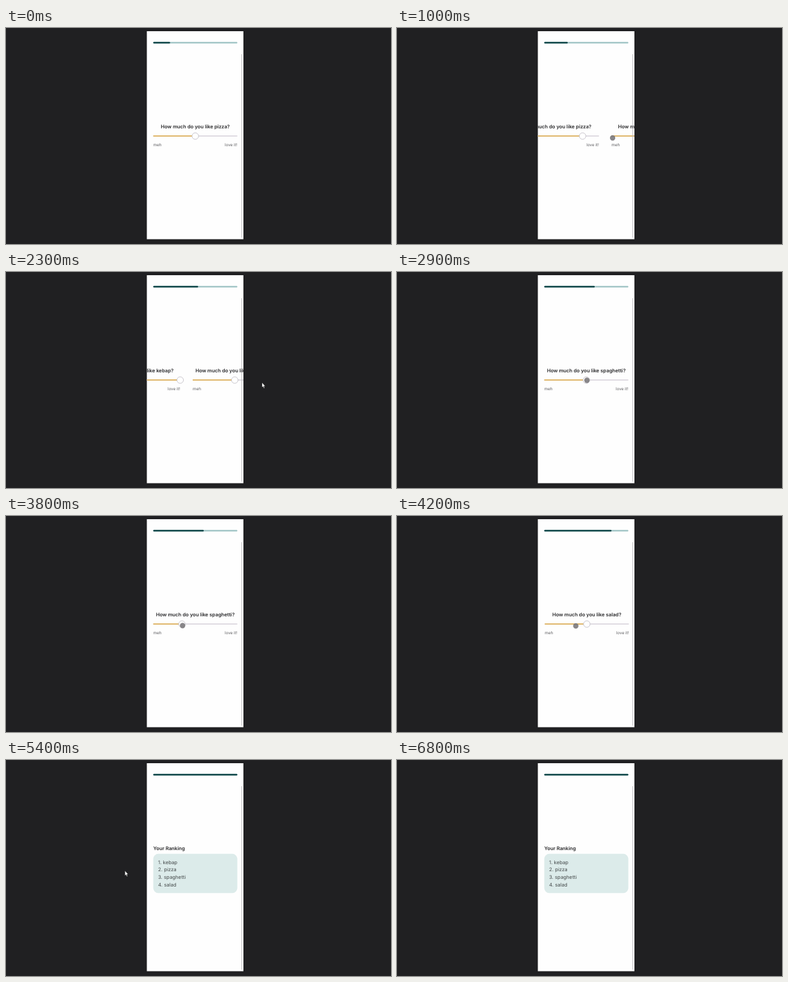
Animation of 600 by 338 pixels, one loop 8 s. Source, as an HTML page:

```html
<!DOCTYPE html>
<html lang="en">
<head>
<meta charset="utf-8">
<title>Food quiz</title>
<style>
html, body { margin: 0; height: 100%; overflow: hidden; background: #202022; }
svg { display: block; width: 600px; height: 338px; }
text { font: 400 6.35px Inter, sans-serif; fill: #5c5c5f; text-rendering: geometricPrecision; }
.title { font-size: 7.71px; font-weight: 600; fill: #29292b; }
.item { font-size: 7.75px; fill: #454a4b; }
</style>
</head>
<body>
<svg viewBox="0 0 600 338">
  <clipPath id="screen"><rect x="219.5" y="5" width="150.5" height="325.5"/></clipPath>
  <rect x="219.5" y="5" width="150.5" height="325.5" fill="#fefefe"/>
  <rect x="229.5" y="21.8" width="131" height="2.4" rx="1" fill="#a2c5c6"/>
  <rect id="bar" x="229.5" y="21.8" height="2.4" rx="1" fill="#0c4446"/>
  <g clip-path="url(#screen)"><g id="pages"></g></g>
  <path d="M367.6 41V328" stroke="#bbb9bd"/>
  <circle id="dot" r="4.2" fill="#777579" fill-opacity=".88"/>
  <path id="arrow" d="M0 0V7.6L1.7 6.1 2.9 8.9 4.1 8.4 2.9 5.7H5.1Z" fill="#fff" stroke="#111" stroke-width=".4"/>
</svg>
<script>
const $ = id => document.getElementById(id);
const LOOP = 8000, STEP = 100, LEFT = 229.5, WIDTH = 131, PAGE = 150.5, SLIDE = 300, PAUSE = 40;
const foods = ['pizza', 'kebap', 'spaghetti', 'salad'];
const ranked = ['kebap', 'pizza', 'spaghetti', 'salad'];

// pointer moves: start, duration, x, y; the first four even ones drag the sliders
const moves = [
  [500, 400, 336, 172], [1400, 300, 299.5, 170.5],
  [1750, 400, 399, 173], [2300, 600, 296, 169.5],
  [3400, 500, 270, 172], [4000, 600, 296, 172],
  [4700, 300, 185, 170], [5000, 600, 185.5, 175],
  [5600, 500, 259, 195], [6500, 200, 151, 61]
];
const drags = foods.map((_, i) => {
  const [grab, time] = moves[2 * i];
  return { grab, drop: grab + time };
});

const clamp = (v, min = 0, max = 1) => Math.min(max, Math.max(min, v));
const ease = u => 1 - (1 - clamp(u) ** 1.35) ** 3;
const slid = t => drags.reduce((sum, d) => sum + ease((t - d.drop - PAUSE) / SLIDE), 0);

const pointer = t => moves.reduce(([x, y], [start, time, toX, toY]) => {
  const u = clamp((t - start) / time);
  return [x + (toX - x) * u, y + (toY - y) * u];
}, [296, 171]);

function knobX({ grab, drop }, t) {
  const pull = pointer(clamp(t, grab, drop))[0] - pointer(grab)[0];
  return LEFT + clamp(WIDTH / 2 + pull, 0, WIDTH);
}

const question = (food, i) => `<g transform="translate(${i * PAGE})">
  <text class="title" x="295" y="157.2" text-anchor="middle">How much do you like ${food}?</text>
  <path d="M229.5 169H360.5" stroke="#d5d1d8" stroke-width="1.5"/>
  <path id="fill${i}" stroke="#dfab45" stroke-width="1.6"/>
  <circle id="knob${i}" cy="169.1" r="5.1" fill="#fff" stroke="#c2bfc7" stroke-width=".9"/>
  <text x="229.5" y="184.5">meh</text>
  <text x="360.5" y="184.5" text-anchor="end">love it!</text></g>`;

const ranking = `<g transform="translate(${foods.length * PAGE})">
  <text class="title" x="229.5" y="140.7">Your Ranking</text>
  <rect x="229.5" y="146.8" width="131" height="61.5" rx="8" fill="#dcebea"/>` +
  ranked.map((food, i) =>
    `<text class="item" x="237" y="${162.8 + 11.6 * i}">${i + 1}. ${food}</text>`).join('') + '</g>';

$('pages').innerHTML = foods.map(question).join('') + ranking;

function draw(t) {
  $('pages').setAttribute('transform', `translate(${-PAGE * slid(t)})`);
  $('bar').setAttribute('width', WIDTH * (1 + slid(t + 15)) / 5);
  drags.forEach((drag, i) => {
    const x = knobX(drag, t);
    $('knob' + i).setAttribute('cx', x);
    $('fill' + i).setAttribute('d', `M${LEFT} 169H${x}`);
  });

  const [x, y] = pointer(t), shown = t >= 500 && t < 6800;
  const inside = x > 219.5 && x < 370;
  for (const [id, on] of [['dot', inside], ['arrow', !inside]]) {
    $(id).setAttribute('transform', `translate(${x} ${y})`);
    $(id).style.display = shown && on ? '' : 'none';
  }
}

const start = performance.now();
function tick() {
  const t = (performance.now() - start) % LOOP;
  draw(Math.floor(t / STEP) * STEP);
  requestAnimationFrame(tick);
}
tick();
</script>
</body>
</html>
```
